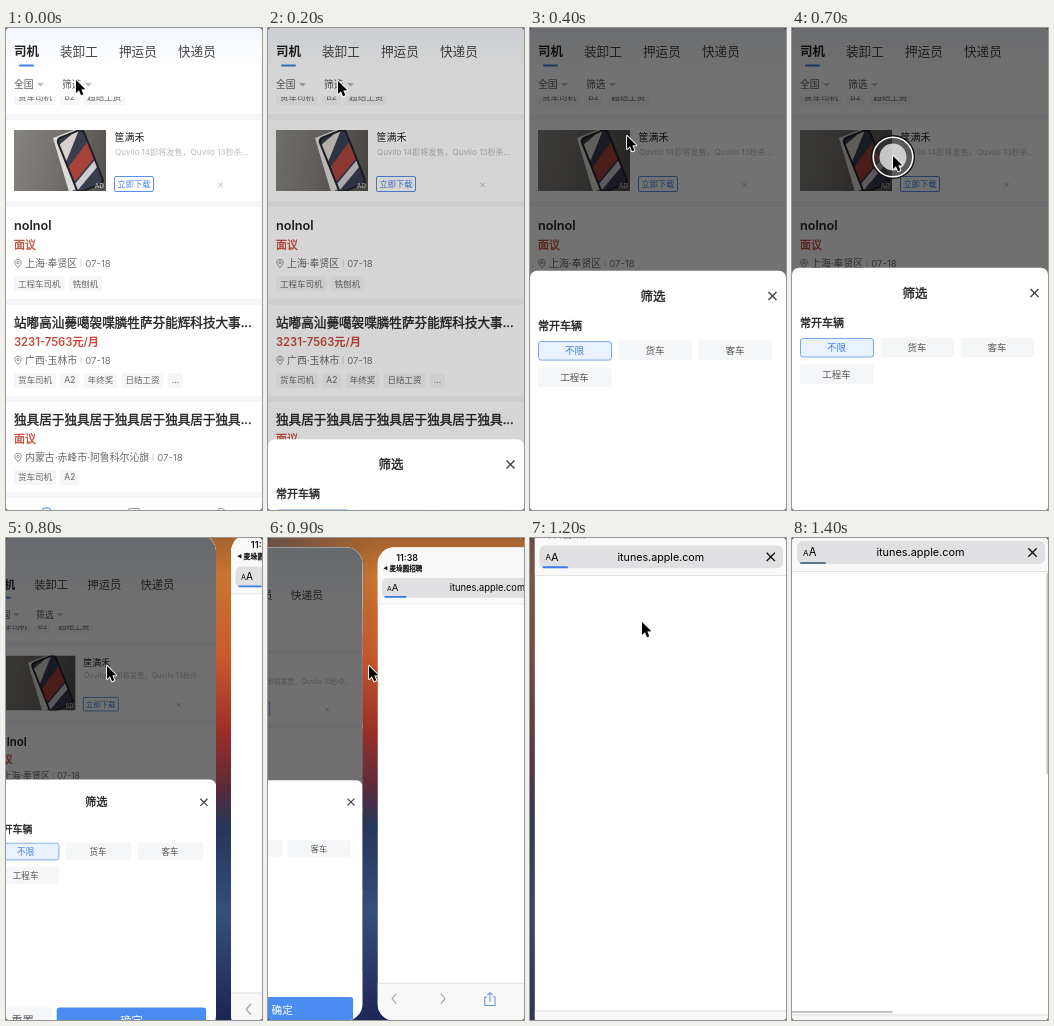
Animation, 256 px wide and 482 px high, one loop 1500 ms. Source, as an HTML page with a canvas:

```html
<!DOCTYPE html>
<html lang="zh-CN">
<head>
<meta charset="utf-8">
<title>招聘</title>
<style>
  html, body { margin: 0; width: 100%; height: 100%; overflow: hidden; background: #fff; }
  canvas { display: block; width: 256px; height: 482px; }
</style>
</head>
<body>
<canvas id="stage"></canvas>
<script>
const W = 256, H = 482, LOOP = 1500, STEP = 100;
// The phone screen is taller than the stage: part of it lies above and below.
const SCREEN_TOP = -33, SCREEN_H = 554, PIVOT_Y = 258, CARD_GAP = 15;
const FONT = 'Inter, "Noto Sans CJK SC", "Noto Sans CJK", "Noto Sans CJK JP", sans-serif';
const BLUE = '#3f7fe0', RED = '#c64a38', INK = '#222', GREY = '#666', PALE = '#f5f6f8';

const canvas = document.getElementById('stage');
const c = canvas.getContext('2d');
const dpr = window.devicePixelRatio || 1;
canvas.width = W * dpr;
canvas.height = H * dpr;

function rect(x, y, w, h, fill) {
  c.fillStyle = fill;
  c.fillRect(x, y, w, h);
}

function roundPath(x, y, w, h, r) {
  c.beginPath();
  c.roundRect(x, y, w, h, r);
}

function box(x, y, w, h, r, fill, stroke) {
  roundPath(x, y, w, h, r);
  if (fill) { c.fillStyle = fill; c.fill(); }
  if (stroke) { c.strokeStyle = stroke; c.lineWidth = 1; c.stroke(); }
}

function circle(x, y, r, fill, stroke, width = 1) {
  c.beginPath();
  c.arc(x, y, r, 0, Math.PI * 2);
  if (fill) { c.fillStyle = fill; c.fill(); }
  if (stroke) { c.strokeStyle = stroke; c.lineWidth = width; c.stroke(); }
}

function line(points, color, width = 1) {
  c.beginPath();
  points.forEach(([x, y]) => c.lineTo(x, y));
  c.strokeStyle = color;
  c.lineWidth = width;
  c.stroke();
}

function poly(points, fill) {
  c.beginPath();
  points.forEach(([x, y]) => c.lineTo(x, y));
  c.closePath();
  c.fillStyle = fill;
  c.fill();
}

// y is the optical middle of the glyphs; returns the width.
function text(str, x, y, size, color = INK, weight = 400, align = 'left') {
  c.font = `${weight} ${size}px ${FONT}`;
  c.textAlign = align;
  c.fillStyle = color;
  c.fillText(str, x, y + size * 0.37);
  return c.measureText(str).width;
}

// Medium weight for Chinese: regular glyphs with a hairline outline.
function mediumText(str, x, y, size, color = INK, align = 'left') {
  text(str, x, y, size, color, 400, align);
  c.strokeStyle = color;
  c.lineWidth = 0.35;
  c.strokeText(str, x, y + size * 0.37);
}

function cross(x, y, r, color, width) {
  line([[x - r, y - r], [x + r, y + r]], color, width);
  line([[x + r, y - r], [x - r, y + r]], color, width);
}

function gradient(x0, y0, x1, y1, stops) {
  const g = c.createLinearGradient(x0, y0, x1, y1);
  stops.forEach(([at, color]) => g.addColorStop(at, color));
  return g;
}

// Linear interpolation through rows of [time, value, value, ...].
function track(keys, t) {
  if (t <= keys[0][0]) return keys[0].slice(1);
  for (let i = 1; i < keys.length; i++) {
    const a = keys[i - 1], b = keys[i];
    if (t <= b[0]) {
      const k = (t - a[0]) / (b[0] - a[0]);
      return a.slice(1).map((v, j) => v + (b[j + 1] - v) * k);
    }
  }
  return keys[keys.length - 1].slice(1);
}

function tags(labels, y) {
  let x = 8;
  for (const label of labels) {
    c.font = `400 8.5px ${FONT}`;
    const w = c.measureText(label).width + 8;
    box(x, y, w, 15, 2, PALE);
    text(label, x + 4, y + 7.3, 8.5, GREY);
    x += w + 4.3;
  }
}

function pin(x, y) {
  c.beginPath();
  c.moveTo(x, y + 4.3);
  c.bezierCurveTo(x - 5.3, y - 1, x - 3.2, y - 4, x, y - 4);
  c.bezierCurveTo(x + 3.2, y - 4, x + 5.3, y - 1, x, y + 4.3);
  c.strokeStyle = '#777';
  c.lineWidth = 0.8;
  c.stroke();
  circle(x, y - 0.8, 1.2, null, '#777', 0.8);
}

function job(y, title, pay, place, labels) {
  // Latin-only titles and figures have a true bold.
  const latin = s => /^[\x00-\x7f]/.test(s);
  if (latin(title)) text(title, 8, y, 12.7, INK, 600);
  else mediumText(title, 8, y, 12.6);
  if (latin(pay)) text(pay, 8, y + 19.5, 11.2, RED, 600);
  else mediumText(pay, 8, y + 19.5, 11, RED);
  const py = y + 37.8;
  pin(12, py);
  const end = 19 + text(place, 19, py, 9.9, GREY);
  rect(end + 3.5, py - 4, 0.8, 8, '#ccc');
  text('07-18', end + 8, py, 9.6, '#777');
  tags(labels, y + 50.5);
}

function photo() {
  c.save();
  c.beginPath();
  c.rect(8, 102, 92, 61);
  c.clip();
  rect(8, 102, 92, 61, gradient(8, 120, 100, 140,
    [[0, '#84827f'], [0.45, '#74716e'], [1, '#55524f']]));
  poly([[47, 110], [70, 101], [80, 157], [63, 164]], '#dddcd8');
  c.translate(74, 132);
  c.rotate(-0.38);
  box(-15, -29, 30, 60, 5, '#1f2026');
  box(-13, -27, 26, 56, 4, '#3a3d4e');
  poly([[-13, -22], [2, -27], [9, -27], [-13, -4]], '#d8d2cb');
  poly([[-13, 2], [13, -14], [13, 4], [-13, 18]], '#a8433c');
  poly([[-13, 20], [13, 6], [13, 13], [-13, 27]], '#cfccd2');
  c.restore();
  text('AD', 98, 158, 6.5, '#ddd', 400, 'right');
}

function jobList() {
  rect(0, SCREEN_TOP, W, SCREEN_H, '#fff');

  tags(['货车司机', 'B2', '超结工资'], 62);
  rect(0, SCREEN_TOP, W, 101.5, '#fff');
  rect(0, SCREEN_TOP, W, 73, gradient(0, SCREEN_TOP, 0, 40, [[0, '#e9f0fb'], [1, '#fff']]));
  text('司机', 8, 23.5, 12.5, INK, 700);
  [['装卸工', 54], ['押运员', 113], ['快递员', 172]]
    .forEach(([label, x]) => text(label, x, 23.5, 12.6, '#444'));
  box(13, 36.5, 15, 2, 1, BLUE);
  [['全国', 8], ['筛选', 56]].forEach(([label, x]) => {
    text(label, x, 56.3, 9.8, '#555');
    poly([[x + 23, 55], [x + 30, 55], [x + 26.5, 58.5]], '#bbb');
  });

  [86, 173, 271, 368, 464].forEach(y => rect(0, y, W, 6, PALE));

  photo();
  text('筐满禾', 108.5, 109.5, 10, INK);
  text('Quvilo 14即将发售，Quvilo 13秒杀…', 109, 124.2, 8.1, '#bbb');
  box(108.5, 148.5, 39, 15, 1.5, '#fff', '#5a8fe4');
  text('立即下载', 128, 156, 8.2, BLUE, 400, 'center');
  cross(214.5, 157, 2.3, '#aaa', 0.8);

  job(197.7, 'nolnol', '面议', '上海·奉贤区', ['工程车司机', '铣刨机']);
  job(294.5, '站嘟高汕薨噶袈喋膦牲萨芬能辉科技大事...', '3231-7563元/月',
    '广西·玉林市', ['货车司机', 'A2', '年终奖', '日结工资', '...']);
  job(391.5, '独具居于独具居于独具居于独具居于独具...', '面议',
    '内蒙古·赤峰市·阿鲁科尔沁旗', ['货车司机', 'A2']);

  rect(0, 470, W, 51, '#fff');
  box(36.5, 480, 8, 12, 2, null, BLUE);
  box(122, 480.5, 12, 10, 2, null, '#999');
  circle(215, 486, 5.5, null, '#999');
}

function sheet(top) {
  box(0, top + 0.7, W, 560 - top, [7, 7, 0, 0], '#fff');
  mediumText('筛选', 123, top + 26, 12.5, INK, 'center');
  cross(242.5, top + 26, 4, '#444', 1.4);
  mediumText('常开车辆', 8, top + 55.5, 11);
  const options = [['不限', 8, 70], ['货车', 88.5, 70], ['客车', 168.5, 70], ['工程车', 8, 97]];
  options.forEach(([label, x, dy], i) => {
    const on = i === 0;
    if (on) box(x + 0.5, top + dy + 1.5, 73, 18.5, 2.5, '#eaf2ff', '#79a6ea');
    else box(x, top + dy + 0.5, 73.5, 19.5, 2, PALE);
    text(label, x + 36.5, top + dy + 10.5, 9.5, on ? BLUE : '#555', 400, 'center');
  });
  box(8, top + 254, 66, 27, 3, PALE);
  text('重置', 41, top + 269, 12.5, '#555', 400, 'center');
  box(79, top + 254, 166, 27, 3, '#4a8df0');
  text('确定', 162, top + 269, 12.5, '#fff', 400, 'center');
}

function filterApp(t) {
  jobList();
  const rest = 1 - Math.min(1, Math.max(0, (t - 156) / 275));
  const open = 1 - rest * rest;
  if (!open) return;
  rect(0, SCREEN_TOP, W, SCREEN_H, `rgba(0,0,0,${0.56 * open})`);
  sheet(239 + 243 * (1 - open));
}

function browserApp(t) {
  rect(0, SCREEN_TOP, W, SCREEN_H, '#fff');
  rect(0, SCREEN_TOP, W, 66, '#f9f9f9');
  text('11:38', 22, -21, 10.4, '#111', 600);
  poly([[7, -8.5], [11.5, -11], [11.5, -6]], '#111');
  mediumText('麦垛圆招聘', 14, -8.5, 7.7, '#111');
  box(5, 3, 248, 23, 6, '#e0e0e2');
  text('A', 11, 15.2, 8, '#000');
  text('A', 16.8, 14.2, 11.2, '#000');
  text('itunes.apple.com', 128.5, 14.2, 10.9, '#000', 400, 'center');
  cross(240.5, 14.5, 4.2, '#111', 1.3);
  box(8, 24, 26, 2, 1, t < 1400 ? '#3a7be8' : '#5f7584');
  rect(0, 33, W, 0.8, '#ddd');

  rect(0, 477, W, 45, '#f8f8f8');
  rect(0, 476.5, W, 0.8, '#d2d2d4');
  line([[22, 489], [17, 495], [22, 501]], '#999', 1.2);
  line([[74, 489], [79, 495], [74, 501]], '#999', 1.2);
  line([[128, 493], [125.5, 493], [125.5, 503], [137.5, 503], [137.5, 493], [135, 493]], '#6b93d8', 1.2);
  line([[131.5, 499], [131.5, 488]], '#6b93d8', 1.2);
  line([[128.5, 491], [131.5, 488], [134.5, 491]], '#6b93d8', 1.2);

  if (t >= 1400) {
    box(254.5, 35, 2, 201, 1, '#c4c4c4');
    box(-2, 473, 103, 2, 1, '#c4c4c4');
  }
}

function wallpaper() {
  rect(0, 0, W, H, gradient(0, 0, 0, H, [
    [0, '#a5632f'], [0.08, '#c9752f'], [0.25, '#c8592d'], [0.4, '#9c2f26'],
    [0.52, '#5a2a3a'], [0.6, '#24365a'], [0.78, '#34507c'], [1, '#1b2455']]));
  rect(0, 0, W, H, gradient(0, 0, 110, 0,
    [[0, 'rgba(62,66,86,0.6)'], [1, 'rgba(62,66,86,0)']]));
}

function card(left, scale, paint) {
  c.save();
  c.translate(left, PIVOT_Y * (1 - scale));
  c.scale(scale, scale);
  roundPath(0, SCREEN_TOP, W, SCREEN_H, 20);
  c.clip();
  paint();
  c.restore();
}

function touch(x, y) {
  circle(x, y, 21, 'rgba(60,60,60,0.4)');
  circle(x, y, 21.3, null, '#111', 1.5);
  circle(x, y, 19.8, null, '#fff', 1.5);
  circle(x, y, 13.5, 'rgba(235,235,235,0.8)');
}

function cursor(x, y) {
  c.save();
  c.translate(x, y);
  c.scale(0.9, 0.9);
  c.beginPath();
  [[0, 0], [0, 14.5], [3.3, 11.5], [5.6, 17], [8.2, 15.9], [5.9, 10.6], [10.3, 10.3]]
    .forEach(p => c.lineTo(...p));
  c.closePath();
  c.lineJoin = 'round';
  c.strokeStyle = '#fff';
  c.lineWidth = 2;
  c.stroke();
  c.fillStyle = '#000';
  c.fill();
  c.restore();
}

// time, left edge of the browser card, scale of both cards
const SWITCH = [[700, 271, 1], [800, 225, 0.9], [900, 109.5, 0.855], [1000, 42, 0.89],
  [1100, 14, 0.945], [1200, 4.6, 0.982], [1300, 1, 0.996], [1400, 0, 1]];
const POINTER = [[0, 70, 52], [200, 70, 53], [300, 72, 56], [400, 97, 108], [500, 100, 124],
  [600, 101, 128], [900, 101, 128], [1000, 102, 124], [1200, 112, 84], [1300, 122, 46]];

function draw(t) {
  c.setTransform(dpr, 0, 0, dpr, 0, 0);
  if (t <= 700) {
    filterApp(t);
  } else {
    const [left, scale] = track(SWITCH, t);
    wallpaper();
    card(left - CARD_GAP - W * scale, scale, () => filterApp(t));
    card(left, scale, () => browserApp(t));
  }
  const [x, y] = track(POINTER, t);
  if (t === 600 || t === 700) touch(x, y + 1);
  if (t < 1400) cursor(x, y);

  // Rounded stage corners
  c.beginPath();
  c.rect(0, 0, W, H);
  c.roundRect(0, 0, W, H, 2.5);
  c.fillStyle = '#333';
  c.fill('evenodd');
}

function tick() {
  draw(Math.floor((performance.now() % LOOP) / STEP) * STEP);
  requestAnimationFrame(tick);
}
tick();
</script>
</body>
</html>
```
